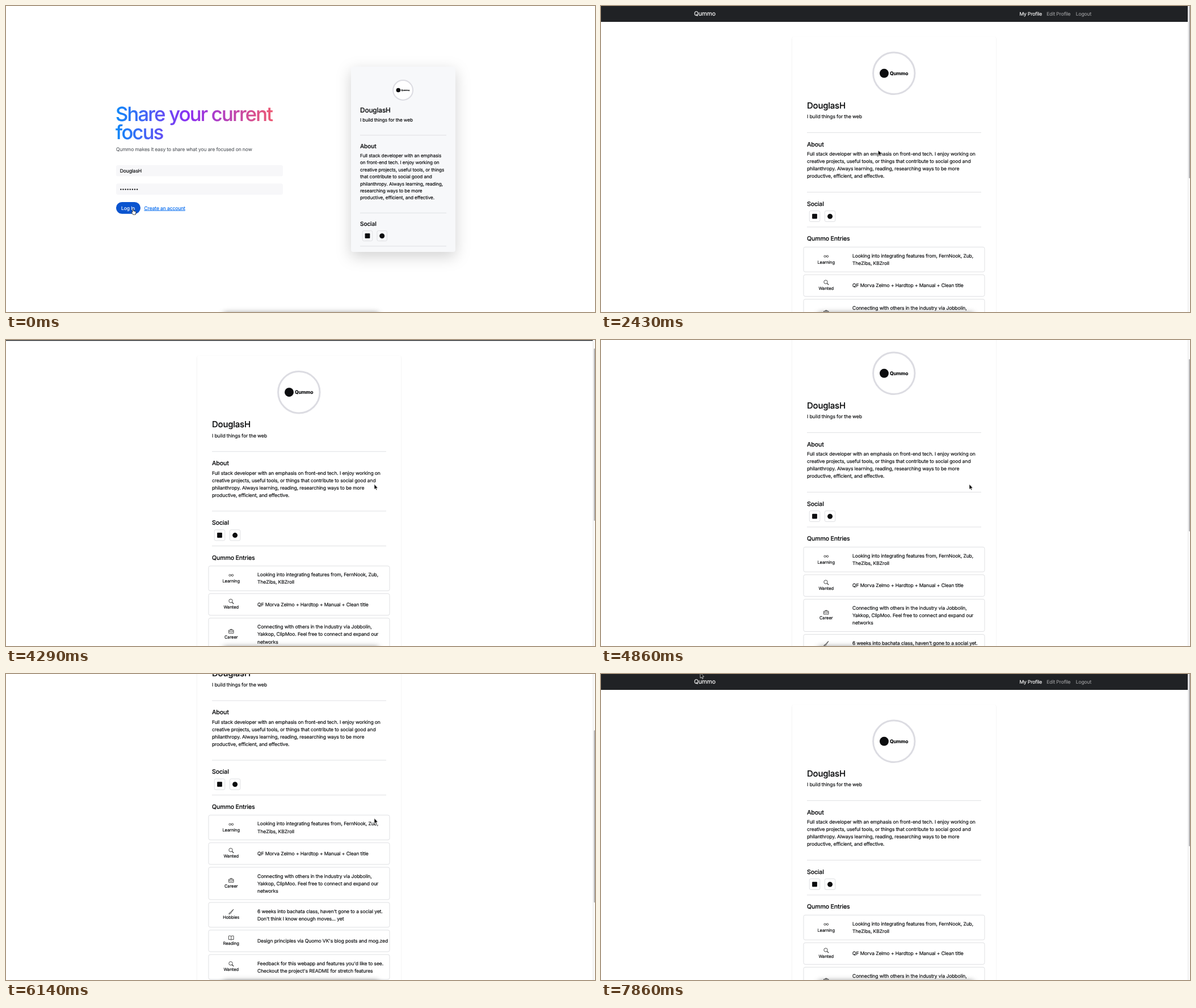
These frames come from a looping animation (1038 px wide and 540 px high, 8 s). An HTML page:

```html
<!DOCTYPE html>
<html lang="en">
<head>
<meta charset="utf-8">
<title>Profile page</title>
<style>
  html, body { margin: 0; width: 100%; height: 100%; overflow: hidden; background: #fff; }
  svg { display: block; width: 1038px; height: 540px; }
  text { font-family: Inter, "Liberation Sans", sans-serif; letter-spacing: -.016em; text-rendering: geometricPrecision; white-space: pre; stroke-width: .16px; }
  .panel { fill: #fff; filter: drop-shadow(0 1px 1.1px rgba(0,0,0,.11)); }
  .lifted { fill: #f7f8fa; filter: drop-shadow(0 8px 13px rgba(0,0,0,.18)); }
  .dock { fill: rgba(0,0,0,.43); filter: blur(5px); }
  .icon { fill: none; stroke: #222; stroke-width: .8; stroke-linejoin: round; }
</style>
</head>
<body>
<svg id="stage" viewBox="0 0 1038 540"></svg>
<script>
const INK = '#0c0d0f', GRAY = '#5f6368', LINE = '#dfe0e3';
const BRAND = 'Qummo', USER = 'DouglasH', TAGLINE = 'I build things for the web';

// y is the middle of the capitals
const text = (x, y, s, size = 8.6, fill = INK, extra = '') =>
  `<text x="${x}" y="${y + size * .36}" font-size="${size}" fill="${fill}" stroke="${fill}" ${extra}>${s}</text>`;
const lines = (x, y, pitch, list, size) => list.map((s, i) => text(x, y + i * pitch, s, size)).join('');
const head = (x, y, s, size = 10.6) => text(x, y, s, size, INK, 'font-weight="500"');
const rect = (x, y, w, h, r, attrs) => `<rect x="${x}" y="${y}" width="${w}" height="${h}" rx="${r}" ${attrs}/>`;
const circle = (x, y, r, attrs = `fill="${INK}"`) => `<circle cx="${x}" cy="${y}" r="${r}" ${attrs}/>`;
const rule = (x, y, w) => rect(x, y - .5, w, 1, 0, `fill="${LINE}"`);
const ring = (x, y, r, w) => circle(x, y, r, `fill="#fff" stroke="#dcdce2" stroke-width="${w}"`);

function badge(x, y, k) {
  return ring(x, y, 36.7 * k, 3 * Math.sqrt(k)) + circle(x - 17.3 * k, y, 8 * k) +
    text(x - 7.3 * k, y, BRAND, 8.6 * k, INK, 'font-weight="700"');
}

function social(x, y, gap, size) {
  const box = cx => rect(cx - size / 2, y - size / 2 - .2, size, size + .6, 2.6, `fill="none" stroke="${LINE}"`);
  return box(x) + box(x + gap) + rect(x - 4.4, y - 4.2, 8.8, 8.8, 1, `fill="${INK}"`) + circle(x + gap, y + .3, 4.5);
}

const icons = {
  Learning: '<circle cx="-2.2" r="1.7"/><circle cx="2.2" r="1.7"/><path d="M-.6-.4h1.2"/>',
  Wanted: '<circle cx="-.8" cy="-.8" r="3.2"/><path d="M1.5 1.5L4.4 4.4" stroke-width="1.2"/>',
  Career: '<path d="M-4.2-1.8H4.2V3.6H-4.2ZM-4.2 .2Q0 2.2 4.2 .2M-1.5-1.8V-3.3H1.5V-1.8"/>',
  Hobbies: '<path d="M4-4.2L-1.6 1.2 -.4 2.4ZM-1.6 1.2Q-3.4 1.4-4 4.2 -1 4.2-.4 2.4"/>',
  Reading: '<path d="M0-2.8Q-2-4-4.3-3.3V3.2Q-2 2.5 0 3.6 2 2.5 4.3 3.2V-3.3Q2-4 0-2.8V3.6"/>'
};

const entries = [
  ['Learning', 'Looking into integrating features from, FernNook, Zub,', 'TheZibs, KBZroll'],
  ['Wanted', 'QF Morva Zelmo + Hardtop + Manual + Clean title'],
  ['Career', 'Connecting with others in the industry via Jobbolin,', 'Yakkop, ClipMoo. Feel free to connect and expand our', 'networks'],
  ['Hobbies', "6 weeks into bachata class, haven't gone to a social yet.", "Don't think I know enough moves... yet"],
  ['Reading', "Design principles via Quomo VK's blog posts and mog.zed"],
  ['Wanted', "Feedback for this webapp and features you'd like to see.", "Checkout the project's README for stretch features"]
];

function cards() {
  let y = 425.4;
  return entries.map(([label, ...rows]) => {
    const h = [38.2, 43.8, 57.1][rows.length - 1], mid = y + h / 2;
    const card = rect(357, y, 319, h, 3, `fill="#fff" stroke="${LINE}"`) +
      `<g class="icon" transform="translate(396.8 ${mid - 5.5})">${icons[label]}</g>` +
      text(396.7, mid + 4.7, label, 7.6, INK, 'text-anchor="middle"') +
      lines(443, mid - (rows.length - 1) * 6.55, 13.1, rows);
    y += h + 5;
    return card;
  }).join('');
}

function login() {
  const dots = Array.from({ length: 8 }, (_, i) => circle(202.4 + i * 4.1, 323.6, 1.2)).join('');
  const big = (y, s) => text(193, y, s, 34.5, 'url(#hue)', 'font-weight="500" style="letter-spacing:-.051em"');
  const about = ['Full stack developer with an emphasis', 'on front-end tech. I enjoy working on',
    'creative projects, useful tools, or things', 'that contribute to social good and',
    'philanthropy. Always learning, reading,', 'researching ways to be more', 'productive, efficient, and effective.'];
  return big(191, 'Share your current') + big(222.6, 'focus') +
    text(194, 253, BRAND + ' makes it easy to share what you are focused on now', 8.6, GRAY) +
    rect(194, 280.8, 294, 19.6, 3.5, 'fill="#f7f7f9"') + text(200.7, 291, USER) +
    rect(194, 313.2, 294, 19.8, 3.5, 'fill="#f7f7f9"') + dots +
    rect(194, 346, 43, 20.7, 10.3, 'fill="#0a54cf"') + text(203, 356.5, 'Log In', 8.6, '#fff') +
    text(243.6, 356.5, 'Create an account', 8.6, '#0b6ff0', 'text-decoration="underline"') +
    rect(608, 107, 184, 327, 4, 'class="lifted"') + badge(699.6, 148.5, .475) +
    head(624, 183.5, USER, 11.9) + text(624, 201, TAGLINE, 8.25) + rule(624, 228, 152) +
    head(624, 247, 'About', 10.2) + lines(624, 264, 12.4, about, 8.25) + rule(624, 365.2, 152) +
    head(624, 384.5, 'Social', 10.2) + social(637, 405.5, 25.7, 17.5) + rule(624, 423.8, 152);
}

const nav = rect(0, 0, 1034, 28, 0, 'fill="#202225"') + text(164, 13.5, BRAND, 10.4, '#fff') +
  text(737.4, 13.5, 'My Profile', 8.6, '#fff') + text(785.3, 13.5, 'Edit Profile', 8.6, '#98999b') +
  text(836.7, 13.5, 'Logout', 8.6, '#98999b');

const panel = h => rect(337, 54, 359, h, 4, 'class="panel"');

function emptyProfile() {
  const note = (y, s) => text(363, y, s, 8.6, GRAY);
  return nav + panel(365.5) + ring(516.3, 118.8, 36.7, 3) + circle(516.3, 118.8, 33.6, 'fill="#c6c6c6"') +
    circle(494.3, 105.3, 5.6, 'fill="#ebebeb"') +
    '<path d="M487 138.5L499 126 506 133 523 117.5 545 138Q541 143 538 146.5H496Q490 143 487 138.5Z" fill="#ebebeb"/>' +
    note(173, 'No tagline available') + rule(363, 201, 307) +
    head(363, 221.5, 'About') + note(239, 'No details available') + rule(363, 266.8, 307) +
    head(363, 287, 'Social') + note(309, 'No social links available') + rule(363, 336.8, 307) +
    head(363, 357.5, BRAND + ' Entries') + note(379, 'There currently are no entries');
}

function fullProfile() {
  const about = ['Full stack developer with an emphasis on front-end tech. I enjoy working on',
    'creative projects, useful tools, or things that contribute to social good and',
    'philanthropy. Always learning, reading, researching ways to be more', 'productive, efficient, and effective.'];
  return nav + panel(755) + badge(516.3, 118.8, 1) +
    head(363, 175.3, USER, 15) + text(363, 195.3, TAGLINE) + rule(363, 223.4, 307) +
    head(363, 244, 'About') + lines(363, 261.2, 13.05, about) + rule(363, 328.5, 307) +
    head(363, 349, 'Social') + social(376.5, 370.9, 27.1, 18.5) + rule(363, 390, 307) +
    head(363, 410.4, BRAND + ' Entries') + cards();
}

const stage = document.getElementById('stage');
stage.innerHTML = `<defs><linearGradient id="hue" gradientUnits="userSpaceOnUse" x1="194" x2="478" y1="0" y2="0">
    <stop stop-color="#1088f8"/><stop offset=".45" stop-color="#8c2ff2"/><stop offset="1" stop-color="#f25a6b"/>
  </linearGradient></defs>
  <g id="login">${login()}</g><g id="empty">${emptyProfile()}</g><g id="full">${fullProfile()}</g>
  <g id="bar">${rect(1034, 0, 4, 540, 0, 'fill="#fafafa"')}${rect(1034, 0, .8, 540, 0, 'fill="#e4e4e4"')}
    <rect id="thumb" x="1036" width="2.6" rx="1.3" fill="#b4b4b6"/></g>
  ${rect(382, 541, 276, 30, 6, 'class="dock"')}
  <path id="hand" d="M-.9 5.5V.9Q0-.4 .9 .9V4L4.6 5Q5.3 5.3 5.2 6.4L4.6 10.5H.2L-2.6 6.9Q-2.3 5.4-.9 6.4Z"
    transform="translate(223.8 357.6)" fill="#fff" stroke="#111" stroke-width=".8"/>
  <path id="arrow" d="M0 0V9.3L2.1 7.3 3.5 10.6 5 10 3.6 6.8H6.4Z" stroke="#fff" stroke-width=".7"/>`;

const $ = id => document.getElementById(id);
const show = (id, on) => $(id).style.display = on ? '' : 'none';

// Keys are [step, value, ...], seven steps a second
const scrollKeys = [[25, 0], [30, 26.6], [33, 48], [34, 60], [36, 88], [38, 88], [39, 103.5], [43, 176.4], [46, 205], [50, 0]];
const arrowKeys = [[13, 224, 354.5], [14, 250, 346], [15, 340, 313], [16, 440, 274], [17, 488.5, 254.5], [19, 488.5, 254.5],
  [20, 535, 249], [21, 600, 245.5], [22, 649, 254.5], [49, 649, 254.5], [52, 176, -14], [54, 176, -14], [55, 175, -2]];

function at(keys, n) {
  const i = keys.findIndex(k => k[0] >= n);
  if (i < 0) return keys[keys.length - 1].slice(1);
  if (!i) return keys[0].slice(1);
  const a = keys[i - 1], b = keys[i], f = (n - a[0]) / (b[0] - a[0]);
  return a.slice(1).map((v, j) => v + (b[j + 1] - v) * f);
}

function draw(now) {
  const n = Math.floor(((now % 8000) + 4) * 7 / 1000) % 56;
  const inside = n >= 9, loaded = n >= 10, [scroll] = at(scrollKeys, n), pageHeight = loaded ? 959 : 569;
  show('login', !inside);
  show('hand', !inside);
  show('empty', inside && !loaded);
  show('full', loaded);
  show('bar', inside);
  show('arrow', inside);
  $('full').setAttribute('transform', `translate(0 ${-scroll})`);
  $('thumb').setAttribute('y', scroll * 540 / pageHeight);
  $('thumb').setAttribute('height', 540 * 540 / pageHeight);
  $('arrow').setAttribute('transform', `translate(${at(arrowKeys, n)})`);
}

const start = performance.now();
function tick() {
  draw(performance.now() - start);
  requestAnimationFrame(tick);
}
tick();
</script>
</body>
</html>
```
